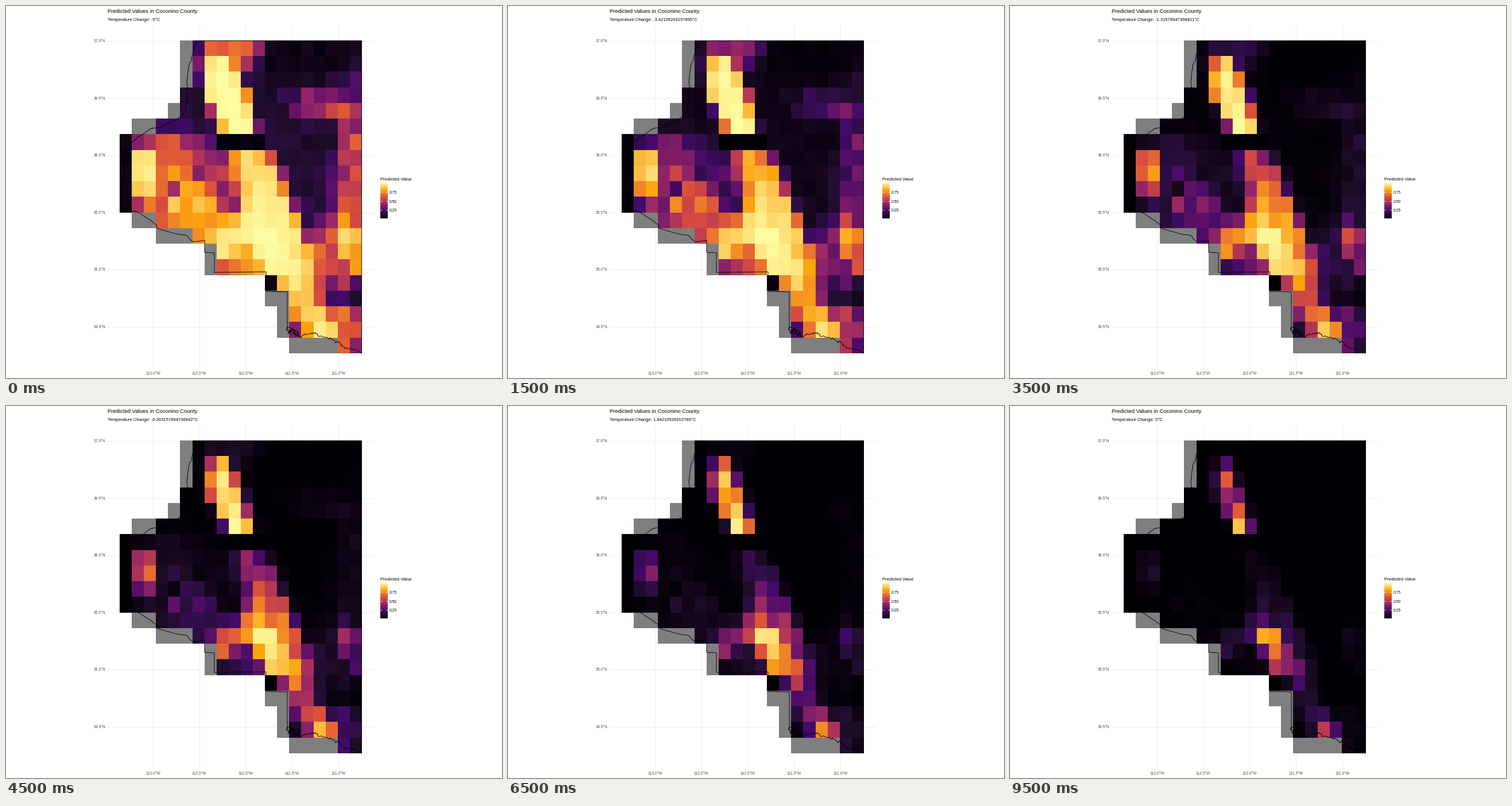
A matplotlib script that plays this animation: 864 by 648 pixels, repeating every 10 s.

```python
import matplotlib.pyplot as plt
import numpy as np
from matplotlib.animation import FuncAnimation
from matplotlib.colors import to_rgb

W, H, N, STEPS = 864, 648, 20, 20
LEFT, RIGHT, TOP, BOTTOM = 198, 619.5, 60, 605
plt.rcParams["font.family"] = "Liberation Sans"
rng = np.random.default_rng(4)

# --- colour ramp: six inferno stops blended in Lab ---
STOPS = ["#000004", "#420A68", "#932667", "#DD513A", "#FCA50A", "#FCFFA4"]
TO_XYZ = np.array([[.4124, .3576, .1805], [.2126, .7152, .0722], [.0193, .1192, .9505]])
WHITE = TO_XYZ.sum(axis=1)


def rgb_to_lab(rgb):
    lin = np.where(rgb > .04045, ((rgb + .055) / 1.055) ** 2.4, rgb / 12.92)
    t = lin @ TO_XYZ.T / WHITE
    f = np.where(t > .008856, np.cbrt(t), 7.787 * t + 16 / 116)
    x, y, z = np.moveaxis(f, -1, 0)
    return np.stack([116 * y - 16, 500 * (x - y), 200 * (y - z)], axis=-1)


def lab_to_rgb(lab):
    y = (lab[..., 0] + 16) / 116
    f = np.stack([y + lab[..., 1] / 500, y, y - lab[..., 2] / 200], axis=-1)
    xyz = np.where(f > .2069, f ** 3, (f - 16 / 116) / 7.787) * WHITE
    lin = np.clip(xyz @ np.linalg.inv(TO_XYZ).T, 0, 1)
    return np.clip(np.where(lin > .0031308, 1.055 * lin ** (1 / 2.4) - .055, 12.92 * lin), 0, 1)


STOP_LAB = rgb_to_lab(np.array([to_rgb(c) for c in STOPS]))


def ramp(p):
    at = np.linspace(0, 1, len(STOPS))
    return lab_to_rgb(np.stack([np.interp(p, at, STOP_LAB[:, k]) for k in range(3)], axis=-1))


# --- log-odds of presence: flat-topped hills and pits on a low plain ---
rows, cols = np.mgrid[0:N, 0:N].astype(float)


def hill(row, col, height, row_size, col_size, tilt=0):
    dr = rows - row
    dc = cols - col - tilt * dr
    return height * np.exp(-((dr / row_size) ** 2 + (dc / col_size) ** 2) ** 2)


odds = -2.4 + rng.normal(0, .35, (N, N))
odds += hill(3, 8.3, 7, 3.1, 1.7, tilt=.4)           # north plateau
odds += hill(0, 9.5, 3, 1.6, 1.8)                    # its northern foot
odds += hill(8.3, 4, 3, 3, 4.6)                      # western uplands
odds += hill(7.8, 1.4, 2.8, 1.8, 1.2)                # western summit
odds += hill(11.5, 6.5, 2.6, 2.2, 4.2)               # south-west slope
odds += hill(13, 9.5, 3.4, 2.2, 3)                   # southern shelf
odds += hill(11.5, 12.4, 5.6, 7, 2.3, tilt=.45)      # long diagonal ridge
odds += hill(8, 19, 2.5, 6.5, 2) + hill(3.6, 16, 2, 1.1, 2.4)     # eastern slopes
odds += hill(13, 17.5, 2.6, 2.6, 2.3) + hill(18, 17.5, 3.6, 1.5, 2.8)
odds += hill(6.1, 9.6, -8, .7, 1.9) + hill(8, 0, -3, 2.7, .6)     # canyon floors
odds += hill(15, 12, -4, .6, .6) + hill(.5, 15, -1.5, 1.5, 4)

# warming bites less on good ground and towards the south
slope = np.maximum(.74 - .045 * np.maximum(odds, 0) - .035 * np.maximum(rows - 10, 0), .25)

# stepped western edge: first drawn and first valued column of each row
drawn = np.repeat([5, 4, 1, 0, 1, 3, 7, 12, 13, 14], [4, 1, 1, 5, 1, 1, 2, 2, 2, 1])
valued = np.repeat([6, 5, 3, 0, 3, 6, 8, 12, 14, 18], [3, 2, 1, 5, 1, 1, 2, 1, 3, 1])


def cell_image(temp):
    rgba = np.ones((N, N, 4))
    rgba[..., :3] = ramp(1 / (1 + np.exp(slope * (temp + 5) - odds)))
    rgba[cols < valued[:, None], :3] = 127 / 255
    rgba[cols < drawn[:, None], 3] = 0
    return rgba


# --- county outline ---
def rough(points, step, amount):
    """Resample a path every few pixels and shake it like a river bank."""
    pts = np.array(points, float)
    dist = np.r_[0, np.cumsum(np.hypot(*np.diff(pts, axis=0).T))]
    s = np.linspace(0, dist[-1], int(dist[-1] / step))
    out = np.stack([np.interp(s, dist, pts[:, k]) for k in (0, 1)], axis=1)
    out[1:-1] += rng.normal(0, amount, out[1:-1].shape)
    return out


north_river = [(331, 61), (325, 86), (319, 104), (315, 128), (316, 160), (311, 186)]
west_river = [(311, 186), (300, 196), (271, 211), (253, 213), (222, 234), (207, 262), (201, 353)]
south_west = [(201, 353), (230, 359), (262, 381), (263, 387), (300, 398), (314, 399),
              (325, 411), (346, 408)]
survey = [(346, 408), (346, 429), (363, 430), (363, 464), (453, 463), (453, 497),
          (490, 498), (490, 563)]
south_river = [(508, 571), (514, 578), (517, 573), (539, 569), (546, 575), (570, 580),
               (574, 587), (577, 584), (590, 596), (606, 598), (619, 604)]
turn = np.linspace(0, 1, 36)
knot = np.stack([490 + 18 * turn + 4 * np.sin(38 * turn),
                 563 + 8 * turn + 5 * np.sin(29 * turn)], axis=1)
outline = np.vstack([
    rough(north_river, 2, .6), rough(west_river, 3, .5), rough(south_west, 4, .3), survey,
    knot, rough(south_river, 1.8, .8), [(619.5, 605), (619.5, 60.5), (331, 60.5)]])

# --- stage ---
fig = plt.figure(figsize=(W / 72, H / 72), dpi=72, facecolor="white")
ax = fig.add_axes([0, 0, 1, 1])
ax.axis("off")


def label(x, y, text, size, color="black", **align):
    return ax.text(x, y, text, fontsize=size, color=color, **align)


def picture(rgb, left, right, top, bottom):
    return ax.imshow(rgb, extent=(left, right, bottom, top), aspect="auto",
                     interpolation="nearest", zorder=1)


for k in range(5):
    x = 256 + 80.7 * k
    ax.plot([x, x], [33, 632], color="#ebebeb", lw=.9, zorder=0)
    label(x, 640.5, f"{113 - k / 2:.1f}°W", 6.8, "#4d4d4d", ha="center", va="center")
for k in range(6):
    y = 61 + 99.55 * k
    ax.plot([177, 640], [y, y], color="#ebebeb", lw=.9, zorder=0)
    label(173.5, y + .5, f"{37 - k / 2:.1f}°N", 6.8, "#4d4d4d", ha="right", va="center")

cells = picture(cell_image(-5), LEFT, RIGHT, TOP, BOTTOM)
ax.plot(*outline.T, color="black", lw=.9, zorder=3)

label(177, 12.3, "Predicted Values in Coconino County", 9.45)
subtitle = label(177, 26.5, "", 7.6)

label(651.5, 303.7, "Predicted Value", 7.75)
picture(ramp(np.linspace(1, 0, 300))[:, None], 652, 664.5, 308, 370)
for value in (.25, .5, .75):
    y = 371 - 62.4 * value
    for x in (652, 662):
        ax.plot([x, x + 2.5], [y, y], color="white", lw=.8, zorder=2, solid_capstyle="butt")
    label(668, y + .3, f"{value:.2f}", 6.7, va="center_baseline")

ax.set_xlim(0, W)
ax.set_ylim(H, 0)


def update(i):
    temp = -5 + 10 * i / (STEPS - 1)
    cells.set_data(cell_image(temp))
    subtitle.set_text(f"Temperature Change: {temp:.15g}°C")
    return cells, subtitle


anim = FuncAnimation(fig, update, frames=STEPS, interval=500, repeat=True, repeat_delay=0)
plt.show()
```
